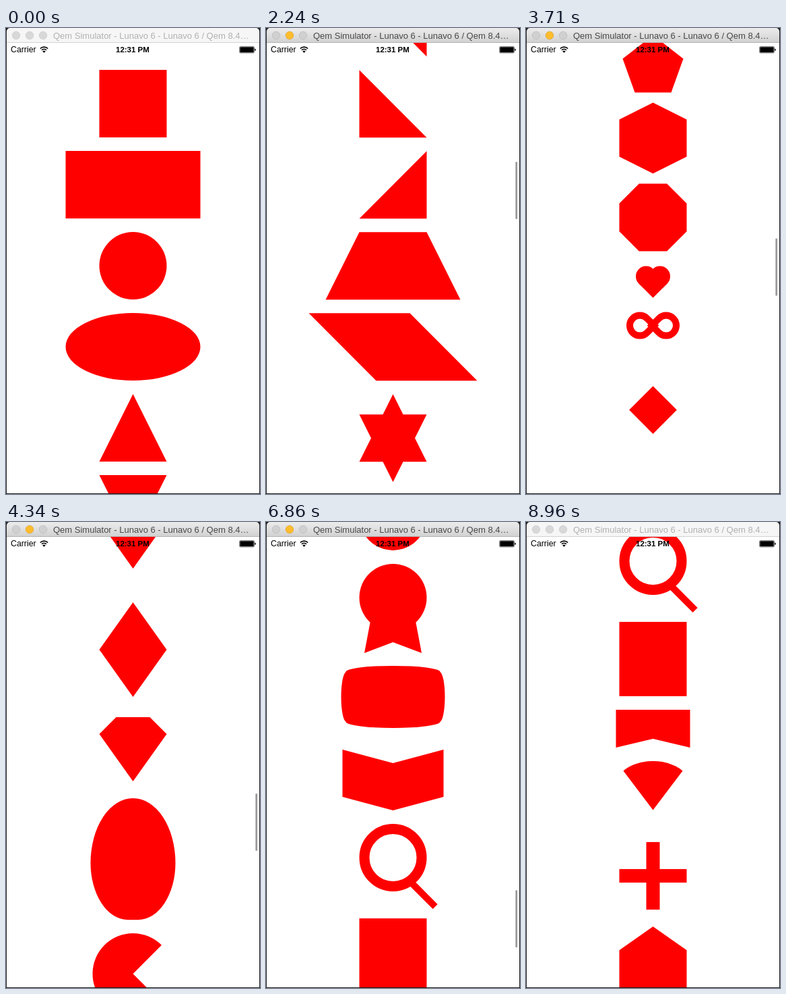
Animation, 377 px wide and 690 px high, one loop 9.17 s. Source, as an HTML page with a canvas:

```html
<!DOCTYPE html>
<html lang="en">
<head>
<meta charset="utf-8">
<title>Shapes</title>
<style>
html, body { margin: 0; width: 100%; height: 100%; overflow: hidden; background: #fff; }
canvas { position: absolute; left: 0; top: 0; width: 377px; height: 690px; }
span { position: absolute; white-space: nowrap; font-family: "Liberation Sans", Arial, sans-serif; color: #000; }
#title { left: 70px; top: 0; font-size: 13px; line-height: 23px; }
.status { top: 22px; line-height: 21px; }
#carrier { left: 7px; font-size: 12.3px; }
#clock { left: 163px; font-size: 11.5px; font-weight: bold; }
</style>
</head>
<body>
<canvas id="stage"></canvas>
<span id="title">Qem Simulator - Lunavo 6 - Lunavo 6 / Qem 8.4…</span>
<span id="carrier" class="status">Carrier</span>
<span id="clock" class="status">12:31 PM</span>
<script>
const W = 377, H = 690, RED = '#f00', RAD = Math.PI / 180;
const LOOP = 9170, STEP = 70, TAU = 250, REST = 8120, GAP = 20;
const title = document.getElementById('title');
const canvas = document.getElementById('stage');
const ctx = canvas.getContext('2d');
const dpr = window.devicePixelRatio || 1;
canvas.width = W * dpr;
canvas.height = H * dpr;

const flicks = [
  { touch: 560, pull: 520, travel: 922.2 },
  { touch: 1960, pull: 350, travel: 1120.6 },
  { touch: 3500, pull: 520, travel: 911.7 },
  { touch: 5040, pull: 400, travel: 746.4 },
  { touch: 6580, pull: 267.3, travel: 714.9 }
];

// Share of a flick covered: steady acceleration, then an exponential glide
function glide(t, pull) {
  const whole = pull + 2 * TAU;
  return t < pull
    ? t * t / (pull * whole)
    : 1 - 2 * TAU / whole * Math.exp((pull - t) / TAU);
}

// Each flick halts one step before the next touch
function scrollAt(t) {
  return flicks.reduce((pos, { touch, pull, travel }, i) => {
    const halt = (flicks[i + 1]?.touch ?? REST) - STEP;
    return t < touch ? pos : pos + travel * glide(Math.min(t, halt) - touch, pull);
  }, 0);
}

function fill(color = RED) {
  ctx.fillStyle = color;
  ctx.fill();
}

function stroke(width, color = RED) {
  ctx.lineWidth = width;
  ctx.strokeStyle = color;
  ctx.stroke();
}

function poly(...points) {
  ctx.beginPath();
  points.forEach(p => ctx.lineTo(...p));
  ctx.closePath();
  fill();
}

// Polygon from its right half, top to bottom
function mirror(...right) {
  poly(...right, ...right.map(([x, y]) => [-x, y]).reverse());
}

function rect(w, h, y = 0) {
  ctx.fillStyle = RED;
  ctx.fillRect(-w / 2, y, w, h);
}

function oval(x, y, rx, ry = rx, color = RED) {
  ctx.beginPath();
  ctx.ellipse(x, y, rx, ry, 0, 0, 2 * Math.PI);
  fill(color);
}

function arc(x, y, r, from, to) {
  ctx.arc(x, y, r, from * RAD, to * RAD);
}

function moved(x, y, angle, flip, paint) {
  ctx.save();
  ctx.translate(x, y);
  ctx.scale(flip, 1);
  ctx.rotate(angle * RAD);
  paint();
  ctx.restore();
}

const bothSides = paint => [1, -1].forEach(flip => moved(0, 0, 0, flip, paint));
const spin = (y, ...angles) => paint => angles.forEach(a => moved(0, y, a, 1, paint));

const triangle = angle => () => spin(50, angle)(() => mirror([0, -50], [50, 50]));
const corner = (sx, sy) => () =>
  poly([-sx * 50, 50 - sy * 50], [sx * 50, 50 - sy * 50], [-sx * 50, 50 + sy * 50]);
const square = (side, y, ...angles) => () =>
  spin(y, ...angles)(() => rect(side, side, -side / 2));

function octagon() {
  const r = 50 / Math.cos(22.5 * RAD);
  poly(...Array.from({ length: 8 }, (_, i) => {
    const a = (22.5 + 45 * i) * RAD;
    return [r * Math.cos(a), 50 + r * Math.sin(a)];
  }));
}

function sixStar() {
  mirror([0, 0], [50, 100]);
  mirror([50, 30], [0, 130]);
}

function fiveStar() {
  moved(12.5, 178, 0, 1, () => {
    bothSides(() => moved(-74, 0, -35, 1, () => poly([0, 0], [200, 0], [100, -70])));
    mirror([0, -179], [30, -99]);
  });
}

function heart() {
  const r = 15.2, k = r * Math.SQRT1_2, x = 10.3, y = 17.2;
  oval(x, y, r);
  oval(-x, y, r);
  mirror([x, y], [x + k, y + k], [0, y + x + 2 * k]);
}

function infinity() {
  bothSides(() => {
    ctx.beginPath();
    arc(-19.5, 20, 15, 45, 315);
    ctx.lineTo(15 * Math.SQRT2 - 19.5, 20);
    ctx.closePath();
    stroke(10);
  });
}

function egg() {
  ctx.beginPath();
  ctx.ellipse(0, 96, 63, 96, 0, Math.PI, 0);
  ctx.ellipse(8, 96, 55, 84, 0, 0, Math.PI / 2);
  ctx.ellipse(-8, 96, 55, 84, 0, Math.PI / 2, Math.PI);
  fill();
}

function wedge() {
  ctx.beginPath();
  ctx.moveTo(0, 60);
  arc(0, 60, 60, 45, 315);
  fill();
}

function bubble() {
  ctx.beginPath();
  ctx.roundRect(-60, 0, 120, 80, 10);
  fill();
  poly([-86, 39], [-59.5, 26], [-59.5, 52]);
}

function yinYang() {
  oval(0, 50, 50);
  ctx.beginPath();
  arc(0, 49, 48, 180, 360);
  fill('#fff');
  oval(-26, 48.5, 24.2);
  oval(23, 49, 25, 25, '#fff');
  ctx.beginPath();
  arc(23, 49, 24.5, 180, 360);
  stroke(0.7, '#f3eeee');
  oval(-26, 48, 4.7, 4.7, '#fff');
  oval(23, 49, 4.2);
}

function ribbon() {
  oval(0, 50, 50);
  mirror([33.4, 84], [42.5, 132], [0, 116]);
}

// A box with shallow elliptical caps on all four sides
function screen() {
  const w = 140, h = 92, cap = h / 10, side = h / 2 - cap;
  rect(w, 2 * side, 1 + cap);
  oval(0, 1 + cap, w / 2, cap);
  oval(0, 1 + h - cap, w / 2, cap);
  bothSides(() => oval(w / 2 - 0.7, 1 + h / 2, 7.7, side));
}

function magnifier() {
  ctx.beginPath();
  arc(0, 50, 42.5, 0, 360);
  stroke(15);
  ctx.beginPath();
  ctx.moveTo(27, 87);
  ctx.lineTo(62.6, 122.6);
  stroke(10);
}

function cone() {
  const a = Math.atan2(3, 4);
  ctx.beginPath();
  ctx.moveTo(0, 72.5);
  ctx.ellipse(0, 36.25, 55, 36.25, 0, Math.PI + a, -a);
  fill();
}

function cross() {
  rect(20, 100);
  rect(100, 20, 40);
}

// Heights and painters, stacked from top to bottom
const shapes = [
  [100, () => rect(100, 100)],
  [100, () => rect(200, 100)],
  [100, () => oval(0, 50, 50)],
  [100, () => oval(0, 50, 100, 50)],
  ...[0, 180, 270, 90].map(a => [100, triangle(a)]),
  ...[1, -1].flatMap(sy => [1, -1].map(sx => [100, corner(sx, sy)])),
  [100, () => mirror([50, 0], [100, 100])],
  [100, () => poly([-125, 0], [25, 0], [125, 100], [-25, 100])],
  [130, sixStar],
  [192, fiveStar],
  [80, () => mirror([0, 0], [45, 35], [27, 85])],
  [100, () => mirror([0, 0], [50, 25], [50, 80], [0, 105])],
  [100, octagon],
  [50, heart],
  [90, infinity],
  [140, square(50, 35, 45)],
  [120, () => mirror([0, 0], [50, 20], [0, 90])],
  [150, () => mirror([0, 0], [50, 70], [0, 140])],
  [100, () => mirror([25, 0], [50, 25], [0, 95])],
  [180, egg],
  [120, wedge],
  [80, bubble],
  [100, square(80, 40, 0, 30, 60)],
  [80, square(80, 40, 20, 65)],
  [100, yinYang],
  [130, ribbon],
  [105, screen],
  [90, () => mirror([0, 20], [75, 0], [75, 70], [0, 90])],
  [120, magnifier],
  [110, () => rect(100, 110)],
  [56, () => mirror([55, 0], [55, 56], [0, 43])],
  [100, cone],
  [105, cross],
  [90, () => mirror([0, 0], [50, 35], [50, 90])]
];

function drawShapes(pos) {
  ctx.save();
  ctx.beginPath();
  ctx.rect(1, 22, 375, 667);
  ctx.clip();
  ctx.translate(W / 2, 62 - pos);
  for (const [height, paint] of shapes) {
    paint();
    ctx.translate(0, height + GAP);
  }
  ctx.restore();
}

function drawTitleBar(active) {
  const shade = ctx.createLinearGradient(0, 0, 0, 21);
  shade.addColorStop(0, active ? '#ececec' : '#f6f6f6');
  shade.addColorStop(1, active ? '#d2d2d2' : '#f6f6f6');
  ctx.beginPath();
  ctx.roundRect(1, 0, 375, 22, [5, 5, 0, 0]);
  fill(shade);
  ctx.fillStyle = active ? '#b2b2b2' : '#d2d2d2';
  ctx.fillRect(1, 21, 375, 1);
  for (let i = 0; i < 3; i++) {
    const lit = active && i === 1;
    oval(15 + 20 * i, 11, 5.8, 5.8, lit ? '#ffbd2e' : active ? '#d0d0d0' : '#d8d8d8');
    stroke(0.7, lit ? '#dca02a' : active ? '#b9b9b9' : '#cacaca');
  }
  title.style.color = active ? '#484848' : '#b1b1b1';
}

function drawStatus() {
  for (const r of [5, 8.1]) {
    ctx.beginPath();
    arc(56.5, 36.2, r, -135, -45);
    stroke(1.6, '#000');
  }
  ctx.beginPath();
  ctx.moveTo(56.5, 36.8);
  arc(56.5, 36.8, 3.2, -135, -45);
  fill('#000');
  ctx.beginPath();
  ctx.roundRect(346.5, 27.5, 22, 9.5, 1.5);
  stroke(0.5, '#000');
  ctx.beginPath();
  ctx.roundRect(347.3, 28.3, 20.4, 7.9, 0.8);
  fill('#000');
  ctx.beginPath();
  arc(369.2, 32.2, 1.6, -90, 90);
  fill('#000');
}

function drawThumb(t, pos) {
  if (t <= flicks[0].touch || t >= REST) return;
  const fade = Math.min(1, (REST - t) / (3 * STEP));
  ctx.beginPath();
  ctx.roundRect(370.3, 45.7 + 0.127 * pos, 2.7, 85, 1.3);
  fill(`rgba(0,0,0,${0.4 * fade})`);
}

function draw(t) {
  const pos = scrollAt(t);
  ctx.setTransform(dpr, 0, 0, dpr, 0, 0);
  ctx.fillStyle = '#1c1c1c';
  ctx.fillRect(0, 0, W, H);
  ctx.fillStyle = '#fff';
  ctx.fillRect(1, 22, 375, 667);
  drawShapes(pos);
  drawThumb(t, pos);
  drawStatus();
  drawTitleBar(t >= 420 && t < 8960);
}

const start = performance.now();
function tick() {
  const t = (performance.now() - start) % LOOP;
  draw(Math.floor(t / STEP) * STEP);
  requestAnimationFrame(tick);
}
tick();
</script>
</body>
</html>
```
